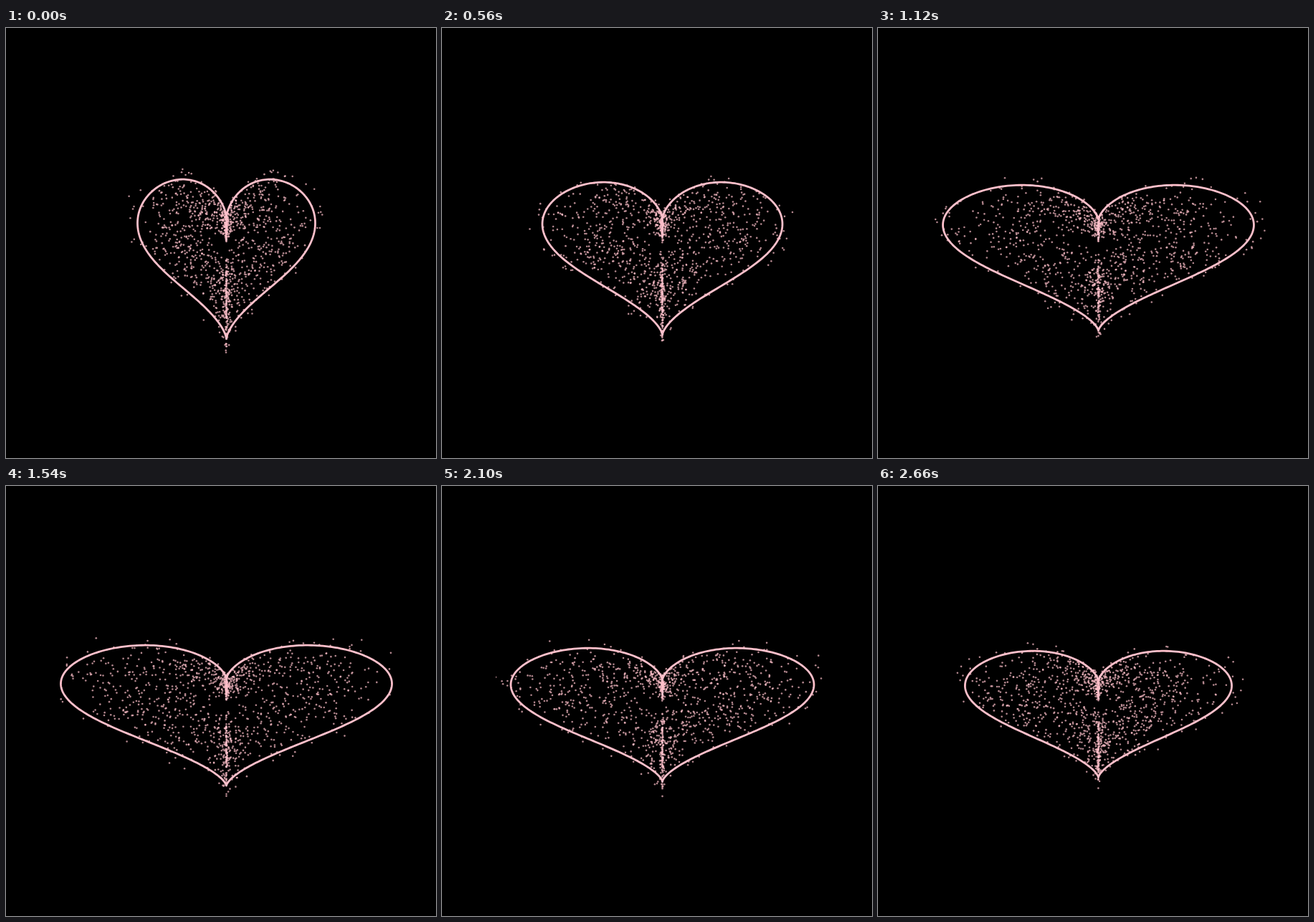
Animation, 600 px wide and 600 px high, one loop 2800 ms. Source, as an HTML page with a canvas:

```html
<!DOCTYPE html>
<html lang="en">
<head>
<meta charset="utf-8">
<title>Beating heart</title>
<style>
  html, body { margin: 0; width: 100%; height: 100%; overflow: hidden; background: #000; }
  canvas { display: block; width: 600px; height: 600px; }
</style>
</head>
<body>
<canvas id="stage" width="600" height="600"></canvas>
<script>
const ctx = document.getElementById('stage').getContext('2d');
const STEPS = 20, STEP_MS = 140, POINTS = 1300;
const PINK = 'rgb(255,192,203)';
const CENTER = { x: 307.5, y: 303 };
const UNIT = { x: 7.75, y: 7.7 };

function seeded(seed) {
  let s = seed;
  return () => {
    s = (s + 0x6D2B79F5) | 0;
    let t = Math.imul(s ^ (s >>> 15), 1 | s);
    t = (t + Math.imul(t ^ (t >>> 7), 61 | t)) ^ t;
    return ((t ^ (t >>> 14)) >>> 0) / 4294967296;
  };
}

// Widens quickly until halfway, then narrows more slowly.
function stretch(step) {
  if (step < STEPS / 2) return 1 + 0.0817 * step + 0.0015 * step * step;
  const d = step - 11;
  return 1.863 - 0.0333 * d - 0.0015 * d * d;
}

const squash = step => 1 - 0.0109 * step;

function heart(t, step, r = 1) {
  const x = 16 * Math.sin(t) ** 3;
  const y = 13 * Math.cos(t) - 5 * Math.cos(2 * t) - 2 * Math.cos(3 * t) - Math.cos(4 * t);
  return [
    CENTER.x + x * r * UNIT.x * stretch(step),
    CENTER.y - y * r * UNIT.y * squash(step)
  ];
}

// Scaled copies of outline points, a few of them beyond the outline.
function drawDots(step) {
  const random = seeded(1000 + step * 7919);
  ctx.fillStyle = PINK;
  ctx.globalAlpha = 0.7;
  for (let i = 0; i < POINTS; i++) {
    const t = random() * Math.PI * 2;
    const r = 0.08 + 0.56 * (random() + random());
    const [x, y] = heart(t, step, r);
    ctx.beginPath();
    ctx.arc(x, y, 1.3, 0, Math.PI * 2);
    ctx.fill();
  }
  ctx.globalAlpha = 1;
}

function drawOutline(step) {
  ctx.beginPath();
  for (let i = 0; i <= 400; i++) ctx.lineTo(...heart(i / 400 * Math.PI * 2, step));
  ctx.strokeStyle = PINK;
  ctx.lineWidth = 2.78;
  ctx.lineJoin = 'round';
  ctx.stroke();
}

function draw(step) {
  ctx.fillStyle = '#000';
  ctx.fillRect(0, 0, 600, 600);
  ctx.save();
  ctx.beginPath();
  ctx.rect(75, 72, 466, 462);
  ctx.clip();
  drawDots(step);
  drawOutline(step);
  ctx.restore();
}

const start = performance.now();
let shown = -1;
function tick() {
  const elapsed = Math.max(0, performance.now() - start);
  const step = Math.floor(elapsed / STEP_MS) % STEPS;
  if (step !== shown) draw(shown = step);
  requestAnimationFrame(tick);
}
tick();
</script>
</body>
</html>
```
